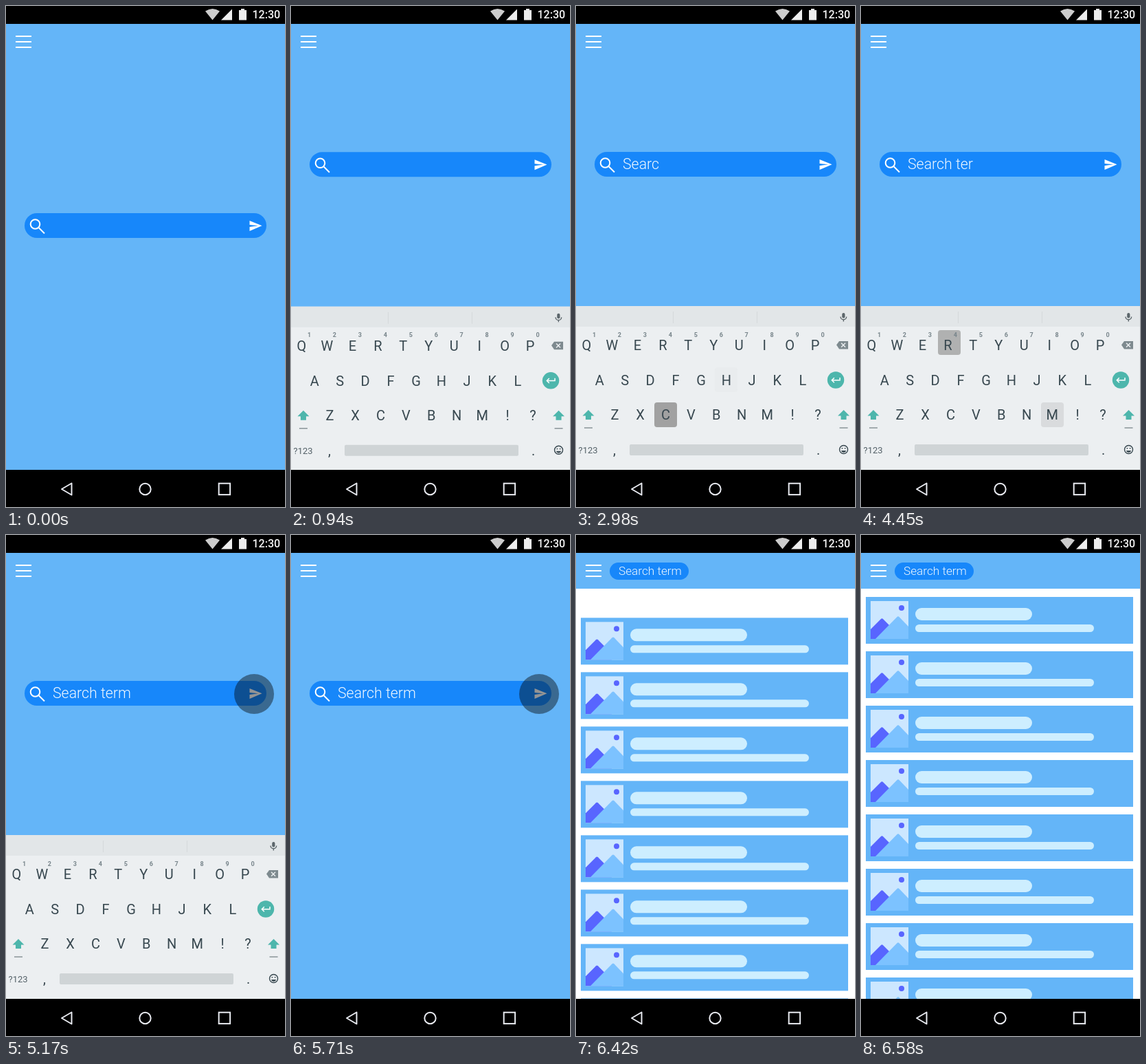
An HTML page for the animation above (7.74 s loop, 406x728 px).

```html
<!DOCTYPE html>
<html lang="en">
<head>
<meta charset="utf-8">
<title>Search flow</title>
<style>
  html, body { margin: 0; width: 100%; height: 100%; overflow: hidden; background: #fff; }
  svg { display: block; width: 100vw; height: 100vh; font-family: Roboto, "Open Sans", sans-serif; }
</style>
</head>
<body>
<svg viewBox="0 0 406 728">
  <rect width="406" height="728" fill="#fff"/>
  <g id="list"></g>
  <rect id="header" y="26" width="406" fill="#64b5f8"/>
  <path d="M14 44H37M14 52H37M14 60H37" stroke="#fff" stroke-width="2"/>
  <rect id="bar" fill="#1787fa"/>
  <g id="icons">
    <g fill="none" stroke="#fff" stroke-width="2">
      <circle cx="42.5" cy="16" r="6.8"/>
      <path d="M47.5 21L56 29.5"/>
    </g>
    <path d="M354.5 11L372.5 18.3L354.5 26V20L367 18.3L354.5 17Z" fill="#fff"/>
  </g>
  <text id="query" font-weight="300" fill="#f0f8ff" xml:space="preserve"></text>
  <g id="keyboard">
    <rect y="436" width="406" height="238" fill="#eceff1"/>
    <rect y="436" width="406" height="30" fill="#e2e6e8"/>
    <path d="M141.5 444V461M263.5 444V461" stroke="#d5d9db"/>
    <g fill="none" stroke="#5c666b" stroke-width="1.4">
      <rect x="387.2" y="446" width="4.2" height="7.5" rx="2.1" fill="#5c666b" stroke="none"/>
      <path d="M385 451.5a4.3 4.3 0 0 0 8.6 0M389.3 456V458.5"/>
    </g>
    <g id="highlights" fill="#9e9e9e"></g>
    <g id="letters" font-size="20" fill="#37474f" text-anchor="middle"></g>
    <g id="digits" font-size="9" font-weight="700" fill="#78858b" text-anchor="middle"></g>
    <path d="M379 492.5L383 487H396V498.5H383Z" fill="#7e8a8f"/>
    <path d="M386 489.8L392 495.8M392 489.8L386 495.8" stroke="#eceff1" stroke-width="1.5"/>
    <circle cx="378" cy="543.5" r="12.2" fill="#4db6ac"/>
    <path d="M384 540V543.8H372.5M375.8 540.3L372.3 543.8L375.8 547.3" fill="none" stroke="#fff" stroke-width="1.5"/>
    <g id="shift">
      <path d="M18 587L26.5 595.5H22V601H14V595.5H9.5Z" fill="#4db6ac"/>
      <path d="M12 613H24" stroke="#8a9499" stroke-width="1.5"/>
    </g>
    <use href="#shift" x="371.5"/>
    <text x="3.5" y="650" font-size="13" fill="#546168">?123</text>
    <text x="54" y="652" font-size="20" fill="#37474f">,</text>
    <text x="350" y="652" font-size="20" fill="#37474f">.</text>
    <rect x="78" y="637" width="253" height="16" rx="2" fill="#cfd4d6"/>
    <g fill="none" stroke="#37474f" stroke-width="1.4">
      <circle cx="389.5" cy="644.5" r="6"/>
      <path d="M386 646a3.6 3.6 0 0 0 7 0Z" fill="#37474f" stroke="none"/>
      <path d="M386.6 642.7H388.2M390.8 642.7H392.4"/>
    </g>
  </g>
  <circle id="touch"/>
  <rect width="406" height="26"/>
  <path d="M290 7.5Q300.5 0.5 311 7.5L300.5 20.5Z" fill="#ccc"/>
  <path d="M313 20.5H329V4.5Z" fill="#eee"/>
  <path d="M339 6H342V4H347V6H350V20.5H339Z" fill="#eee"/>
  <text x="358.5" y="18" font-size="16" font-weight="500" fill="#f2f2f2">12:30</text>
  <rect y="674" width="406" height="54"/>
  <g fill="none" stroke="#e8eaf0" stroke-width="2">
    <path d="M95.5 693.5V710.5L81 702Z" stroke-linejoin="round"/>
    <circle cx="202.5" cy="702" r="8.2"/>
    <rect x="309.7" y="693.7" width="16.4" height="16.4"/>
  </g>
</svg>
<script>
const LOOP = 7740;
const KEY_FADE = 350;
const LETTER_DELAY = 250;
const $ = id => document.getElementById(id);
const set = (node, attrs) => { for (const k in attrs) node.setAttribute(k, attrs[k]); };
const add = (parent, tag, attrs, text) => {
  const node = document.createElementNS("http://www.w3.org/2000/svg", tag);
  set(node, attrs);
  if (text) node.textContent = text;
  return parent.appendChild(node);
};
const lerp = (a, b, p) => a + (b - a) * p;
const easeOut = (t, start, duration) => {
  const u = Math.min(1, Math.max(0, (t - start) / duration));
  return 1 - (1 - u) ** 3;
};

// Key presses: highlighted key, start time, text it adds
const presses = [
  ["S", 1095, "S"], ["E", 1480, "e"], ["A", 1870, "a"], ["R", 2190, "r"],
  ["C", 2590, "c"], ["H", 2976, "h"], ["T", 3330, " t"], ["E", 3660, "e"],
  ["R", 3960, "r"], ["M", 4420, "m"]
];
const TAP = 4780;

const highlights = {};
const rows = [["QWERTYUIOP", 15.5, 500], ["ASDFGHJKL", 34.2, 551], ["ZXCVBNM!?", 56.5, 601]];
rows.forEach(([chars, x0, y], row) => [...chars].forEach((char, i) => {
  const x = x0 + 36.95 * i;
  add($("letters"), "text", { x, y }, char);
  if (row === 0) add($("digits"), "text", { x: x + 11, y: 480.5 }, String((i + 1) % 10));
  highlights[char] = add($("highlights"), "rect", {
    x: Math.round(x - 16.5) + (char === "R" ? 2 : 0), y: y - (row === 2 ? 25 : row === 1 ? 26 : 29),
    width: 33, height: 36, rx: 4, opacity: 0
  });
}));

for (let i = 0; i < 8; i++) {
  const card = add($("list"), "g", { transform: `translate(7 ${90 + 79 * i})` });
  const rect = (x, y, width, height, fill, rx = 0) => add(card, "rect", { x, y, width, height, fill, rx });
  rect(0, 0, 389, 68, "#64b5f8");
  rect(7, 6, 55, 55, "#cce7ff");
  add(card, "path", { d: "M7 47L22 32Q23.500 30.500 25 32L45 52V61H7Z", fill: "#5865ff" });
  add(card, "path", { d: "M14 61L45.500 29Q47 27.500 48.500 29L62 43V61Z", fill: "#7cc2ff" });
  add(card, "circle", { cx: 52, cy: 16, r: 4, fill: "#5865ff" });
  rect(72, 16, 170, 18, "#cdeeff", 9);
  rect(72, 40, 260, 11, "#cdeeff", 5.5);
}

function drawKeys(t) {
  for (const key in highlights) highlights[key].setAttribute("opacity", 0);
  let typed = "";
  presses.forEach(([key, start, text], i) => {
    const end = i + 1 < presses.length ? presses[i + 1][1] : TAP;
    const shown = easeOut(t, start, KEY_FADE) * (1 - easeOut(t, end, KEY_FADE));
    if (shown > 0) highlights[key].setAttribute("opacity", shown);
    if (t >= start + LETTER_DELAY) typed += text;
  });
  $("query").textContent = typed;
}

function drawTouch(t, collapse) {
  const second = t >= TAP;
  const grow = second ? easeOut(t, TAP, 390) : easeOut(t, 290, 200);
  const fade = second ? collapse : easeOut(t, 600, 400);
  const size = grow * (1 - fade);
  const tint = second ? fade : 0;
  const opacity = tint > 0 ? Math.min(1, 2.2 * (1 - fade)) * lerp(0.42, 0.9, tint) : 0.42 * size;
  set($("touch"), {
    cx: second ? 361 : 93, cy: second ? 231 : 318,
    r: lerp(12.5, 29, size),
    fill: `rgb(${[100, 181, 248].map(c => Math.round(c * tint))})`,
    opacity
  });
}

function draw(t) {
  const raise = easeOut(t, 600, 400);
  const dismiss = easeOut(t, 5230, 450);
  const collapse = easeOut(t, 5850, 300);
  const reveal = easeOut(t, 6150, 430);

  const barY = lerp(301, 212, raise);
  const barHeight = lerp(36, 25, collapse);
  set($("bar"), {
    x: lerp(27, 49, collapse), y: lerp(barY, 40, collapse),
    width: lerp(352, 115, collapse), height: barHeight, rx: barHeight / 2
  });
  set($("icons"), { transform: `translate(0 ${barY})`, opacity: 1 - collapse });
  set($("query"), {
    x: lerp(68, 62, collapse), y: lerp(237, 58, collapse),
    "font-size": lerp(21.3, 17.2, collapse)
  });
  set($("header"), { height: lerp(648, 52, collapse) });
  set($("keyboard"), { transform: `translate(0 ${238 * (1 - raise + dismiss)})` });
  set($("list"), { transform: `translate(0 ${600 * (1 - reveal)})` });
  drawKeys(t);
  drawTouch(t, collapse);
}

const began = performance.now();
function tick() {
  draw((performance.now() - began) % LOOP);
  requestAnimationFrame(tick);
}
draw(0);
requestAnimationFrame(tick);
</script>
</body>
</html>
```
